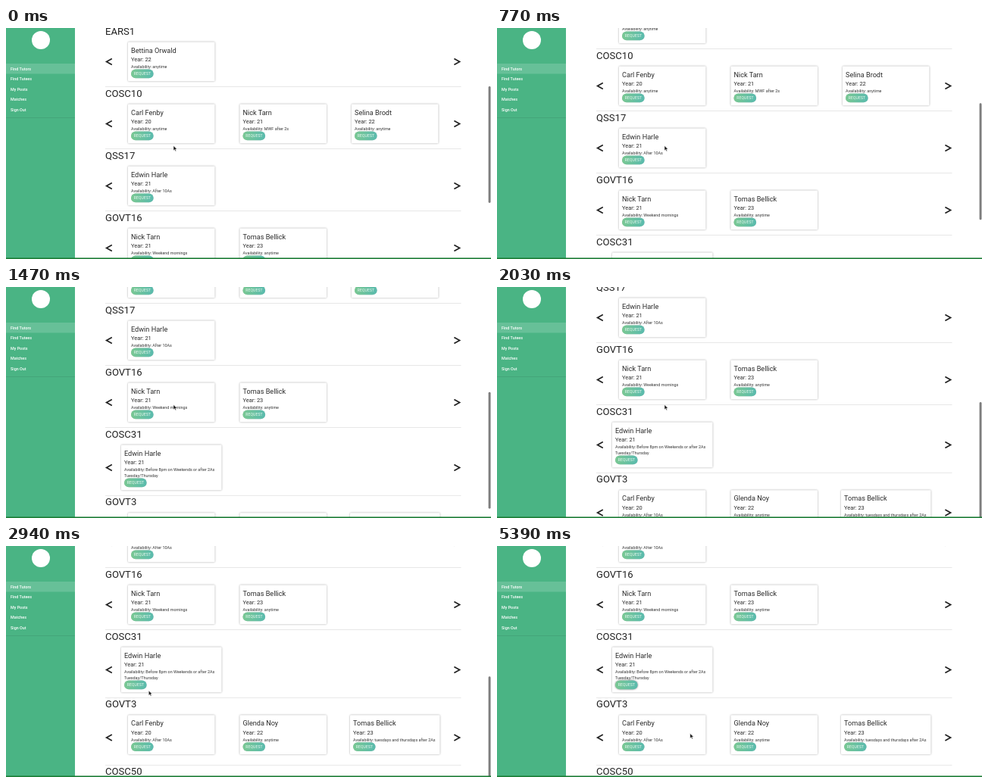
Write an HTML page that moves like this. It is 640 px wide and 305 px high and loops after 5460 ms.

```html
<!DOCTYPE html>
<html lang="en">
<head>
<meta charset="utf-8">
<title>Find Tutors</title>
<style>
html, body { margin: 0; width: 100%; height: 100%; overflow: hidden; background: #fff; }
svg { display: block; width: 100vw; height: 100vh; }
text { font-family: Roboto, Arial, sans-serif; fill: #2b2b2b; white-space: pre; }
.head { font-size: 13.1px; fill: #222; }
.name { font-size: 9.15px; }
.year { font-size: 7.45px; }
.info { font-size: 5.4px; fill: #333; }
.label { font-size: 5px; letter-spacing: .15px; fill: #eefaf3; }
.menu { font-size: 5.4px; font-weight: 500; fill: #fff; }
.card { fill: #fff; filter: drop-shadow(0 .7px .8px rgba(0,0,0,.36)); }
.pill { fill: url(#mint); filter: drop-shadow(0 .6px .6px rgba(0,0,0,.22)); }
.pill.focus { filter: drop-shadow(0 .8px 1px rgba(0,0,0,.5)); }
.arrow { fill: none; stroke: #222; stroke-width: 1.7; }
</style>
</head>
<body>
<svg id="stage" viewBox="0 0 640 305" preserveAspectRatio="none">
  <defs>
    <linearGradient id="mint"><stop offset="0" stop-color="#7ac893"/><stop offset="1" stop-color="#5abbae"/></linearGradient>
  </defs>
  <rect width="640" height="305" fill="#fff"/>
  <g id="page"></g>
  <rect id="bar" x="636.6" width="2.9" height="154" rx="1.45" fill="#7d7d7d"/>
  <g id="side">
    <rect width="91" height="305" fill="#4ab484"/>
    <rect y="47" width="91" height="13.5" fill="#fff" opacity=".16"/>
    <rect y="118" width="91" height=".7" fill="#000" opacity=".12"/>
    <circle cx="46" cy="16" r="12" fill="#fff"/>
  </g>
  <rect y="303.4" width="640" height="1.6" fill="#1c7d36"/>
  <g id="pointer">
    <path id="tip" d="M0 0V6.2L1.5 4.9L2.5 7.2L3.6 6.7L2.6 4.5L4.6 4.4Z" fill="#111" stroke="#fff" stroke-width=".5"/>
    <path id="hand" d="M-.5 0Q.5-.8 1.1.2V2.4L4 3.1Q4.6 3.4 4.4 4.4L3.8 7H.1L-2.1 4.3Q-2.2 3.2-.6 4Z" fill="#fff" stroke="#222" stroke-width=".65"/>
  </g>
</svg>
<script>
const LOOP = 5460, STEP = 70;
const $ = id => document.getElementById(id);

function add(parent, tag, attrs, text) {
  const el = document.createElementNS('http://www.w3.org/2000/svg', tag);
  for (const key in attrs) el.setAttribute(key, attrs[key]);
  if (text) el.textContent = text;
  parent.appendChild(el);
  return el;
}
const write = (parent, cls, x, y, text) => add(parent, 'text', { class: cls, x, y }, text);

const [ann, carl, nick, selina, edwin, tomas, glenda] = [
  ['Bettina Orwald', 22], ['Carl Fenby', 20], ['Nick Tarn', 21], ['Selina Brodt', 22],
  ['Edwin Harle', 21], ['Tomas Bellick', 23], ['Glenda Noy', 22]
];

// course, heading centre, arrow offset, cards: [person, availability lines, left, width]
const rows = [
  ['EARS1', 4, 40.4, [[ann, ['anytime']]]],
  ['COSC10', 86, 40.4, [[carl, ['anytime']], [nick, ['MWF after 2s']], [selina, ['anytime']]]],
  ['QSS17', 168, 40.4, [[edwin, ['After 10As']]]],
  ['GOVT16', 250, 40.4, [[nick, ['Weekend mornings']], [tomas, ['anytime']]]],
  ['COSC31', 332, 44.4, [[edwin, ['Before 8pm on Weekends or after 2As', 'Tuesday/Thursday'], 152, 132.5]]],
  ['GOVT3', 421.7, 44.2, [[carl, ['After 10As']], [glenda, ['anytime']],
    [tomas, ['tuesdays and thursdays after 2As'], 454, 118.5]]],
  ['COSC50', 510.7, 40.4, []]
];

function card(mid, [[name, age], lines, left, width = 114.5], i) {
  const x = left || 161 + i * 147.5, tx = x + 4;
  const extra = (lines.length - 1) * 8;
  add(page, 'rect', { class: 'card', x, y: mid + 14.6, width, height: 51.6 + extra, rx: 1.2 });
  write(page, 'name', tx, mid + 28.5, name);
  write(page, 'year', tx, mid + 39.9, 'Year: ' + age);
  lines.forEach((line, n) =>
    write(page, 'info', tx, mid + 49 + n * 7.8, (n ? '' : 'Availability: ') + line));
  const button = add(page, 'g', {});
  const y = mid + 50.5 + extra;
  add(button, 'rect', { class: 'pill', x: tx, y, width: 29.6, height: 11.8, rx: 5.9 });
  write(button, 'label', tx + 3.7, y + 7.8, 'REQUEST');
  return button;
}

const page = $('page');
let target;
for (const [course, mid, off, cards] of rows) {
  add(page, 'rect', { x: 131, y: mid - 8.8, width: 469.5, height: .8, fill: '#e2e2e2' });
  write(page, 'head', 131, mid + 4.7, course);
  const y = mid + off;
  add(page, 'path', { class: 'arrow', d: `M139.8 ${y - 4}L132.6 ${y}L139.8 ${y + 4}M591.4 ${y - 4}L598.6 ${y}L591.4 ${y + 4}` });
  cards.forEach((c, i) => {
    const button = card(mid, c, i);
    if (course === 'COSC31') target = button;
  });
}
['Find Tutors', 'Find Tutees', 'My Posts', 'Matches', 'Sign Out'].forEach((item, i) =>
  write($('side'), 'menu', 6, 55.7 + i * 13.55, item));

// piecewise linear track of [time, value]
function track(keys, t) {
  const i = keys.findIndex(k => k[0] > t);
  if (i < 0) return keys[keys.length - 1][1];
  if (i === 0) return keys[0][1];
  const [t0, a] = keys[i - 1], [t1, b] = keys[i];
  return a + (b - a) * (t - t0) / (t1 - t0);
}
const scrollKeys = [[0, 0], [210, 17], [420, 38.4], [560, 46], [770, 50], [840, 50], [1050, 113],
  [1120, 113], [1190, 121.7], [1400, 136], [1540, 140], [1680, 140], [2030, 168], [2240, 199], [2380, 209], [2520, 213]];
const xKeys = [[2660, 221], [2940, 188.3], [3220, 180], [3570, 180], [3640, 174], [3710, 174], [3920, 177], [3990, 177], [4060, 177.3]];
const yKeys = [[2660, 155.5], [2940, 191], [3220, 184.5], [3570, 184.5], [3640, 179], [3710, 179], [3920, 183.2], [4060, 183.6]];
const fadeKeys = [[2940, 1], [3220, 0]];
const hoverKeys = [[3710, 0], [3920, 1], [5040, 1], [5250, 0]];

function draw(time) {
  const t = Math.floor(time % LOOP / STEP) * STEP;
  const scroll = track(scrollKeys, t);
  page.setAttribute('transform', `translate(0 ${-scroll})`);
  $('bar').setAttribute('y', 77 + scroll * .447);
  $('bar').setAttribute('opacity', track(fadeKeys, t));

  const leave = Math.min(1, Math.max(0, (t - 4760) / 630)) ** 2.5;
  const x = track(xKeys, t) + 77.5 * leave;
  const y = track(yKeys, t) + 64 * leave;
  const over = t > 3000 && x < 186 && y > 177 && y < 189.5;
  $('pointer').setAttribute('transform', `translate(${x} ${y})`);
  $('tip').setAttribute('visibility', over ? 'hidden' : 'visible');
  $('hand').setAttribute('visibility', over ? 'visible' : 'hidden');

  target.setAttribute('opacity', 1 - .2 * track(hoverKeys, t));
  target.firstChild.classList.toggle('focus', t >= 4200);
}

const start = performance.now();
function tick() {
  draw(performance.now() - start);
  requestAnimationFrame(tick);
}
tick();
</script>
</body>
</html>
```
